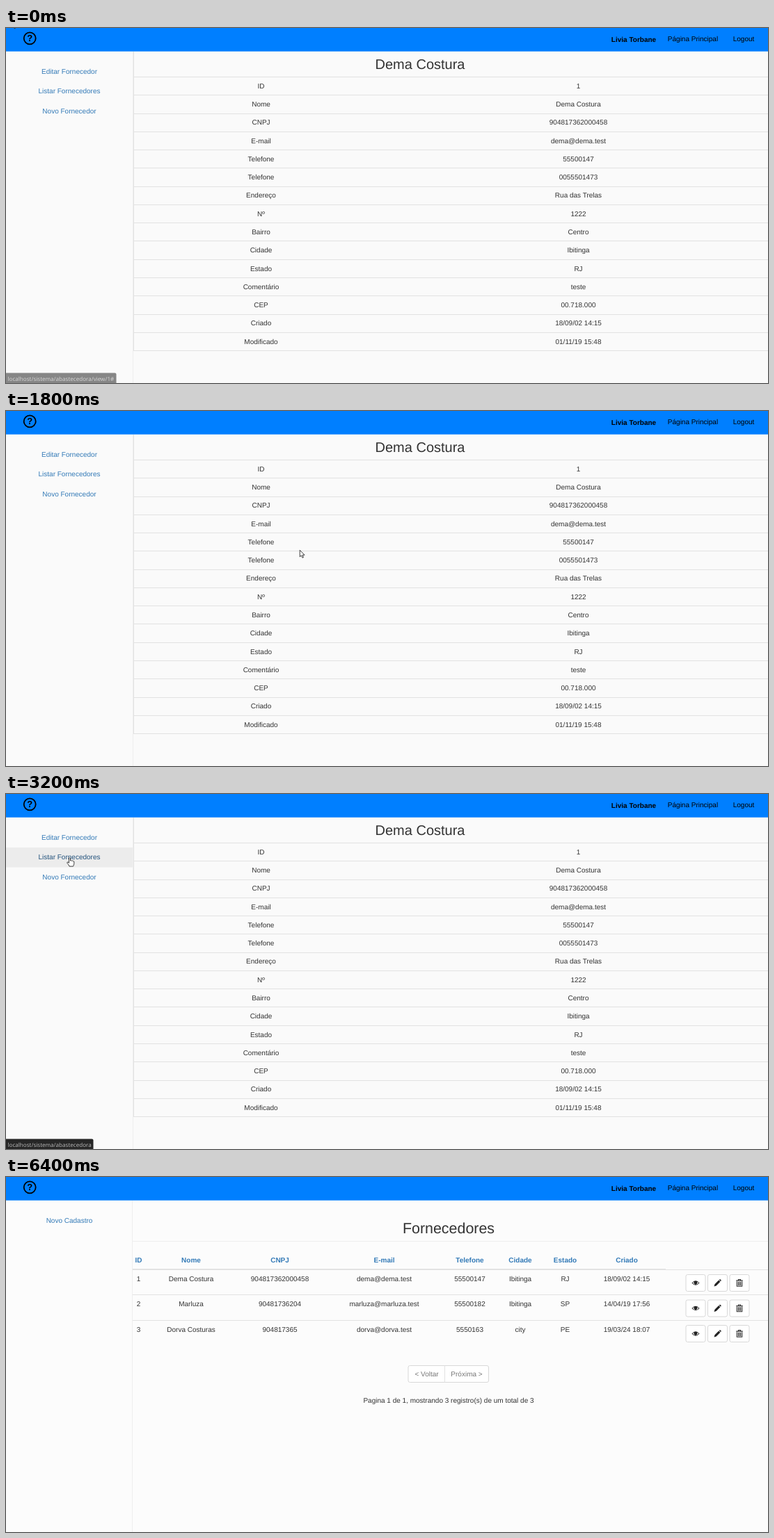
An HTML page for the animation above (6900 ms loop, 1095 by 511 pixels).

```html
<!DOCTYPE html>
<html lang="pt-BR">
<head>
<meta charset="utf-8">
<title>Fornecedores</title>
<style>
html, body { margin: 0; width: 100%; height: 100%; overflow: hidden; background: #fafafa; }
svg { display: block; width: 100%; height: 100%; }
text {
  font: 10px "Liberation Sans", Arial, sans-serif; fill: #333;
  text-anchor: middle; text-rendering: geometricPrecision; white-space: pre;
}
.link { fill: #337ab7; }
.link.on { fill: #23527c; }
.head { font-weight: bold; fill: #337ab7; }
.bar { fill: #000; }
.bold { fill: #000; font-weight: bold; }
.page { fill: #777; }
.status { font: 8.1px "Open Sans", "Noto Sans", sans-serif; fill: #bdbdbd; text-anchor: start; }
</style>
</head>
<body>
<svg viewBox="0 0 1095 511">
  <defs>
    <g id="eye">
      <path d="M-5.5 0Q0-6.6 5.5 0Q0 6.6-5.5 0Z" fill="#222"/>
      <path d="M-4.2 0Q-3.4-1.5-2.4-2Q-3.2 1 0 2.7Q-2.8 2-4.2 0ZM4.2 0Q3.4-1.5 2.4-2Q3.2 1 0 2.7Q2.8 2 4.2 0Z" fill="#fff"/>
    </g>
    <path id="pen" d="M-5 5L-4 1.8L1.7-3.9L3.9-1.7L-1.8 4ZM2.3-4.5Q3.7-6 5-4.2Q5.7-3.5 4.5-2.3Z" fill="#222"/>
    <path id="bin" d="M-4.8-3.4H4.8M-1.6-3.6V-5H1.6V-3.6M-3.7-2.3V4.8H3.7V-2.3M-1.7-1.8V3.8M0-1.8V3.8M1.7-1.8V3.8" fill="none" stroke="#333" stroke-width="1.1"/>
  </defs>
  <g id="view"></g>
  <g id="list"></g>
  <g id="top"></g>
  <g id="status">
    <path id="chip" fill="#262626"/>
    <text id="label" class="status" x="2.5" y="507.5"></text>
  </g>
  <g id="cursor" stroke="#111" stroke-width=".8" stroke-linejoin="round" fill="#fff">
    <path id="arrow" d="M.4 .4V10L2.6 8L4.1 11.4L5.7 10.7L4.2 7.4H7.2Z"/>
    <path id="hand" d="M-1.5 1Q-.5-.6 .5 1V4.6Q2.1 3.4 2.5 4.9Q3.9 3.8 4.5 5.2Q5.8 4.8 5.8 6.2V9Q5.5 11 4.5 12.6H-1Q-1.7 10.4-4.1 7.8Q-4.3 6-2.8 6.4L-1.5 7.8Z"/>
  </g>
</svg>
<script>
const LOOP = 6900, STEP = 100, LOADED = 5100;
const LINE = "#e2e2e2", PALE = "#eee";
const $ = id => document.getElementById(id);

const text = (x, y, s, cls = "", size = 10) =>
  `<text x="${x}" y="${y}" class="${cls}" style="font-size:${size}px">${s}</text>`;
const rect = (x, y, w, h, fill, extra = "") =>
  `<rect x="${x}" y="${y}" width="${w}" height="${h}" fill="${fill}" ${extra}/>`;
const hline = (x, y, x2, fill = LINE) => rect(x, y, x2 - x, 1, fill);
const box = (x, y, w, h) => rect(x, y, w, h, "#fff", 'rx="2.5" stroke="#d8d8d8"');
const repeat = (list, make) => list.map(make).join("");

// Sidebar rows
const TOP = 48.5, PITCH = 28.5;
const menu = (id, labels) => repeat(labels, (s, i) =>
  rect(0, TOP + PITCH * i, 182, PITCH, "#ececec", `id="${id}Row${i}"`) +
  text(91, TOP + 17.1 + PITCH * i, s, "link", 10).replace("<text", `<text id="${id}Link${i}"`));

const record = [
  ["ID", "1"], ["Nome", "Dema Costura"], ["CNPJ", "904817362000458"],
  ["E-mail", "dema@dema.test"], ["Telefone", "55500147"], ["Telefone", "0055501473"],
  ["Endereço", "Rua das Trelas"], ["Nº", "1222"], ["Bairro", "Centro"],
  ["Cidade", "Ibitinga"], ["Estado", "RJ"], ["Comentário", "teste"],
  ["CEP", "00.718.000"], ["Criado", "18/09/02 14:15"], ["Modificado", "01/11/19 15:48"]
];
const columns = {
  ID: 190.5, Nome: 266, CNPJ: 393.5, "E-mail": 543.5,
  Telefone: 666.5, Cidade: 739, Estado: 803.5, Criado: 892
};
const suppliers = [
  Object.keys(columns).map(name => record.find(r => r[0] === name)[1]),
  ["2", "Marluza", "90481736204", "marluza@marluza.test", "55500182", "Ibitinga", "SP", "14/04/19 17:56"],
  ["3", "Dorva Costuras", "904817365", "dorva@dorva.test", "5550163", "city", "PE", "19/03/24 18:07"]
];

function buildView() {
  const pitch = 26.27;
  return rect(0, 0, 1095, 511, "#fafafa") +
    rect(182, 34, 1, 477, PALE) + rect(183, 34, 1, 431, LINE) +
    menu("view", ["Editar Fornecedor", "Listar Fornecedores", "Novo Fornecedor"]) +
    text(595, 59, "Dema Costura", "", 20) +
    hline(183, 464, 1095) +
    repeat(record, ([name, value], i) => {
      const y = 70 + pitch * i;
      return hline(183, Math.round(y), 1095) +
        text(366.5, y + 16.8, name) + text(822.5, y + 16.8, value);
    });
}

function buildList() {
  const xs = Object.values(columns);
  const button = (icon, i, y) => {
    const x = 977 + 31.5 * i;
    return box(x, y, 28, 24) + `<use href="#${icon}" x="${x + 14}" y="${y + 12}"/>`;
  };
  const row = (cells, i) => {
    const y = 133 + 36.5 * i;
    return hline(182, Math.floor(y), 1095) +
      repeat(cells, (s, c) => text(xs[c], y + 16.7, s)) +
      repeat(["eye", "pen", "bin"], (icon, k) => button(icon, k, y + 7.5));
  };
  return rect(0, 0, 1095, 511, "#fcfcfc") +
    rect(181, 34, 1, 477, PALE) +
    menu("list", ["Novo Cadastro"]) +
    text(636, 81, "Fornecedores", "", 21.43) +
    hline(182, 92, 1095, PALE) +
    repeat(Object.keys(columns), (s, c) => text(xs[c], 122.7, s, "head")) +
    hline(182, 132, 948) +
    repeat(suppliers, row) +
    box(578, 271.5, 115.5, 24) + rect(630, 271.5, 1, 24, LINE) +
    text(604.5, 286.7, "&lt; Voltar", "page") + text(662, 286.7, "Próxima &gt;", "page") +
    text(636, 324.5, "Pagina 1 de 1, mostrando 3 registro(s) de um total de 3");
}

function buildTop() {
  return rect(0, 0, 1095, 33.7, "#007fff") +
    '<circle cx="34.2" cy="14.8" r="8.5" fill="none" stroke="#000" stroke-width="1.8"/>' +
    text(34.2, 19.3, "?", "bold", 13) + text(902, 20, "Livia Torbane", "bold") +
    text(987, 19, "Página Principal", "bar") + text(1060, 19, "Logout", "bar");
}

$("view").innerHTML = buildView();
$("list").innerHTML = buildList();
$("top").innerHTML = buildTop();

// Pointer strokes, each curving on from the last: start, end, control point, end point
const strokes = [
  [0, 400, 62, -8, 275, 48],
  [500, 1100, 133, 250, 519, 206],
  [1500, 2200, 456, 246, 158, 66],
  [2200, 2500, 130, 61, 119.5, 61.5],
  [2500, 2900, 118, 64, 104, 96],
  [3000, 3200, 98, 95, 92, 91.5],
  [5700, 5800, 98, 78, 100, 64],
  [5800, 6400, 890, 515, 775, -20]
];
const clamp = v => Math.min(1, Math.max(0, v));
const ramp = (t, from, to) => clamp((t - from) / (to - from));
const bezier = (a, b, c, u) => (1 - u) ** 2 * a + 2 * u * (1 - u) * b + u * u * c;

function pointer(t) {
  let x = 8, y = -10.6;
  for (const [from, to, cx, cy, ex, ey] of strokes) {
    const u = ramp(t, from, to);
    x = bezier(x, cx, ex, u);
    y = bezier(y, cy, ey, u);
    if (u < 1) break;
  }
  return [x, y];
}

const base = "localhost/sistema/abastecedora";
function statusAt(t, item) {
  if (t >= LOADED) return [363, "Aguardando localhost..."];
  if (item === 1) return [125, base];
  return item === 0 ? [151, base + "/edit/1"] : [158, base + "/view/1#"];
}
const statusFade = t =>
  .54 * (1 - ramp(t, 0, 200)) + ramp(t, 2100, 2300) - ramp(t, LOADED, LOADED + 500);

const show = (id, on) => $(id).setAttribute("display", on ? "inline" : "none");

function hover(id, count, active) {
  for (let i = 0; i < count; i++) {
    show(id + "Row" + i, i === active);
    $(id + "Link" + i).classList.toggle("on", i === active);
  }
}

function draw(time) {
  const t = Math.floor(time % LOOP / STEP) * STEP;
  const listed = t >= LOADED;
  show("view", !listed);
  show("list", listed);

  const [x, y] = pointer(t);
  const item = x < 182 ? Math.floor((y - TOP) / PITCH) : -1;
  hover("view", 3, item);
  hover("list", 1, item);

  const hand = listed ? item === 0 || t < LOADED + 200 : item >= 0 && item < 3;
  show("hand", hand);
  show("arrow", !hand);
  $("cursor").setAttribute("transform", `translate(${x} ${y})`);

  const [w, label] = statusAt(t, item);
  $("chip").setAttribute("d", `M0 496.5H${w - 1.5}Q${w + .5} 496.5 ${w + .5} 498.5V511H0Z`);
  $("label").textContent = label;
  $("status").setAttribute("opacity", statusFade(t));
}

const start = performance.now();
function tick() {
  draw(performance.now() - start);
  requestAnimationFrame(tick);
}
tick();
</script>
</body>
</html>
```
